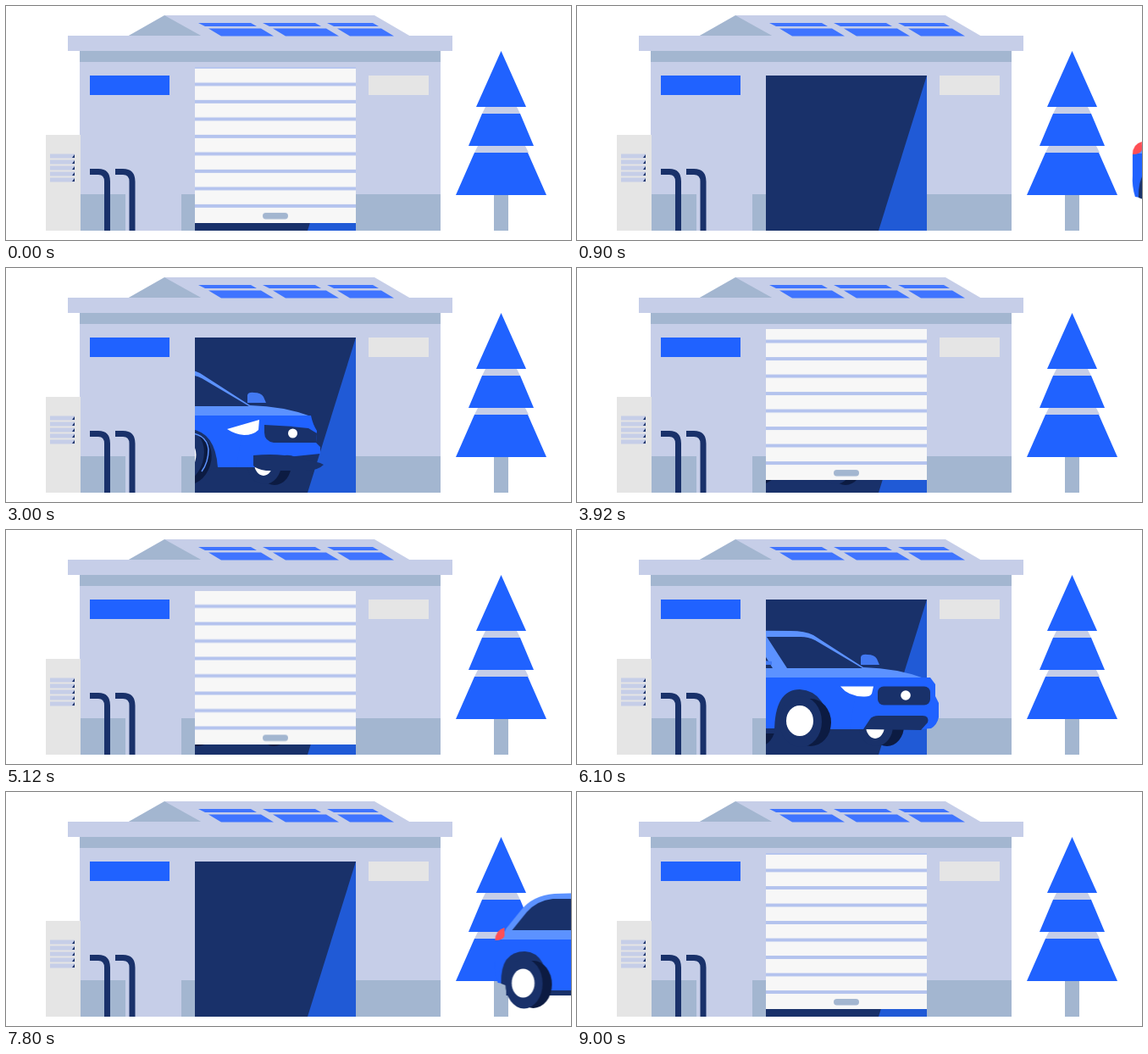
An HTML page that plays this animation: 667x276 px, repeating every 10000 ms.

```html
<!DOCTYPE html>
<html lang="en">
<head>
<meta charset="utf-8">
<title>Garage</title>
<style>
  html, body { margin: 0; width: 100%; height: 100%; overflow: hidden; background: #fff; }
  svg { display: block; width: 100%; height: 100%; }

  .lilac { fill: #c6cee8; }
  .slate { fill: #a3b6d0; }
  .grey { fill: #e5e5e5; }
  .blue { fill: #2062ff; }
  .sky { fill: #5c92ff; }
  .panel { fill: #3f74ff; }
  .navy { fill: #19316a; }
  .night { fill: #0c1b42; }
  .white { fill: #fff; }

  .car, .door, .arriving, .leaving { animation: 10s linear infinite; }
  .car { animation-name: drive; }
  .door { animation-name: roll; }
  .arriving { animation-name: arriving; }
  .leaving { animation-name: leaving; }

  @keyframes drive {
    0% { transform: translateX(420px); }
    8.79% { transform: translateX(420px); animation-timing-function: cubic-bezier(.333, .667, .667, 1); }
    30%, 59.3% { transform: translateX(-218px); }
    59.3% { animation-timing-function: cubic-bezier(.333, 0, .667, .333); }
    82%, 100% { transform: translateX(445px); }
  }
  @keyframes roll {
    0% { transform: translateY(-10px); animation-timing-function: cubic-bezier(.3, .2, .58, 1); }
    10% { transform: translateY(-197px); }
    30% { transform: translateY(-197px); animation-timing-function: ease-in-out; }
    41.5% { transform: none; }
    49.1% { transform: none; animation-timing-function: ease-in-out; }
    61% { transform: translateY(-197px); }
    79.5% { transform: translateY(-197px); animation-timing-function: cubic-bezier(.42, 0, .7, .8); }
    90%, 100% { transform: translateY(-10px); }
  }
  /* The front end straightens while the door hides it. */
  @keyframes arriving {
    0%, 45% { visibility: visible; }
    45.01%, 100% { visibility: hidden; }
  }
  @keyframes leaving {
    0%, 45% { visibility: hidden; }
    45.01%, 100% { visibility: visible; }
  }
</style>
</head>
<body>
<svg viewBox="0 0 667 276" preserveAspectRatio="none">
  <defs>
    <clipPath id="outside"><path d="M223 0H667V276H223z"/></clipPath>
    <clipPath id="doorway"><path d="M223 72H413V266H223z"/></clipPath>
    <pattern id="slats" x="223" y="225.5" width="190" height="20.5" patternUnits="userSpaceOnUse">
      <path fill="#f7f7f7" d="M0 0H190V20.5H0z"/>
      <path fill="#b4c3ee" d="M0 18.5H190V20.5H0zM0 0H190V2H0z"/>
    </pattern>
  </defs>

  <g id="tree">
    <path class="lilac" d="M566 119H603L607 127H562zM557 165H613L617 173H553z"/>
    <path class="slate" d="M576 223H593V265H576z"/>
    <path class="blue" d="M584.5 53L614 119H555zM562 127H607L623 165H546zM553 173H616L638 223H531z"/>
  </g>

  <g id="building">
    <path class="lilac" d="M187 11H435L478 36H187zM87 50H513V265H87z"/>
    <path class="slate" d="M143 36L187 11L232 36z"/>
    <path class="slate" d="M87 53H513V66H87zM87 222H141V265H87zM207 222H223V265H207zM413 222H513V265H413z"/>
    <path class="lilac" d="M73 35H527V53H73z"/>
    <path class="panel" d="M227 20H289L296 24H235zM239 26.5H301L316 35.5H254z
      M303 20H365L372 24H311zM315 26.5H378L393 35.5H330z
      M379 20H433L440 24H387zM391 26.5H443L458 35.5H406z"/>
    <path class="blue" d="M99 82H193V105H99z"/>
    <path class="grey" d="M428 82H499V105H428zM47 152H88V265H47z"/>
    <path stroke="#c6cee8" stroke-width="5" d="M52 177H81M52 184H81M52 191H81M52 198H81M52 205H81"/>
    <path class="navy" d="M81 175V179H78zM81 182V186H78zM81 189V193H78zM81 196V200H78zM81 203V207H78z"/>
    <path fill="none" stroke="#19316a" stroke-width="7" d="M99 195.5H109Q119.5 195.5 119.5 207V265M129 195.5H138Q149 195.5 149 207V265"/>
    <path class="navy" d="M223 82H413V265H223z"/>
    <path fill="#205ad6" d="M413 82V265H356z"/>
  </g>

  <g clip-path="url(#outside)">
    <g class="car">
      <!-- far wheels -->
      <ellipse class="night" cx="383" cy="231" rx="19" ry="24"/>
      <ellipse class="navy" cx="372" cy="231" rx="18" ry="24"/>
      <ellipse class="white" cx="371" cy="232" rx="11" ry="15"/>
      <g class="arriving">
        <ellipse class="night" cx="535" cy="231" rx="20" ry="25"/>
        <ellipse class="navy" cx="523" cy="231" rx="20" ry="24"/>
        <ellipse class="white" cx="522" cy="230" rx="11" ry="15"/>
      </g>
      <g class="leaving">
        <ellipse class="night" cx="534" cy="231" rx="20" ry="24"/>
        <ellipse class="navy" cx="521" cy="231" rx="20" ry="24"/>
        <ellipse class="white" cx="520" cy="231" rx="11" ry="15"/>
      </g>

      <!-- cabin -->
      <path fill="#4279f2" d="M503 159V150Q504 146 511 147Q519 147 522 152L525 159z"/>
      <path class="sky" d="M255 175L262 161L279 140Q293 122 319 120Q370 118 420 119Q437 119 447 124L506 162Q546 163 578 175z"/>
      <path class="navy" d="M269 163L286 142Q298 128 317 126H369Q376 126 380 132L399 163zM392 126H432Q441 126 449 130L505 163H416z"/>
      <path fill="#4279f2" d="M363 158Q363 148 375 147Q385 147 389 154L398 155V159H364z"/>

      <!-- side -->
      <path class="navy" d="M262 226H470V240H262z"/>
      <path class="blue" d="M249 174H530V233Q525 235 500 235H468L464 234H305L252 225Q248 212 249 200z"/>
      <path fill="#ff4f55" d="M260 160V170Q258 175 249 175Q249 163 260 160z"/>
      <rect class="navy" x="351" y="184.500" width="20" height="4.500" rx="2.200"/>

      <!-- rear wheel -->
      <path class="navy" d="M256 226Q255 188 284 188Q311 189 313 239H290z"/>
      <ellipse class="night" cx="294" cy="227" rx="22" ry="28"/>
      <ellipse class="navy" cx="283" cy="226" rx="22" ry="29.500"/>
      <ellipse class="white" cx="282" cy="225.500" rx="13.500" ry="17"/>

      <g class="arriving">
        <path class="blue" d="M500 174H578Q580 184 585 192L584 206L589 211V219L550 223L520 223L505 235H490z"/>
        <path class="navy" d="M523 185Q550 186 575 189L585 195L584 206L534 206Q523 204 523 194z"/>
        <path class="navy" d="M510 221Q530 219 547 221Q553 220 560 223L589 230L593 232Q586 239 572 239H525Q513 237 510 233z"/>
        <path class="white" d="M479 190L517 179L516 191Q510 197 499 197Q488 196 479 190z"/>
        <circle class="white" cx="556.500" cy="195" r="5.500"/>
        <path class="navy" d="M403 239Q403 190 435 190Q465 193 468 235L455 240z"/>
        <ellipse class="night" cx="437" cy="226" rx="23" ry="30" transform="rotate(17 437 226)"/>
        <ellipse class="navy" cx="429" cy="223" rx="22" ry="31" transform="rotate(17 429 223)"/>
        <path fill="none" stroke="#5c92ff" stroke-width="1.500" d="M428 194Q455 194 457 214Q457 229 449 240"/>
        <ellipse class="white" cx="427" cy="223.500" rx="15" ry="20" transform="rotate(17 427 223.500)"/>
      </g>

      <g class="leaving">
        <path class="blue" d="M500 174H585L591 182V196L595 204V221Q593 230 586 234L574 235H490z"/>
        <rect class="navy" x="523" y="184.500" width="62" height="22" rx="7"/>
        <path class="navy" d="M506 235L514 223Q517 219 524 219H576Q584 219 582 227L574 236z"/>
        <path class="white" d="M479 184.500H518L516 193Q514 197 506 196.500Q488 196 479 184.500z"/>
        <circle class="white" cx="556" cy="195" r="5.800"/>
        <path class="navy" d="M401 239Q401 188 431 188Q464 190 466 239z"/>
        <ellipse class="night" cx="444" cy="227" rx="24" ry="28"/>
        <ellipse class="navy" cx="432" cy="226" rx="25" ry="30"/>
        <ellipse class="white" cx="431" cy="225" rx="16" ry="18"/>
      </g>
    </g>
  </g>

  <g clip-path="url(#doorway)">
    <g class="door">
      <path fill="url(#slats)" d="M223 60H413V266H223z"/>
      <rect class="slate" x="303" y="254" width="30" height="7.500" rx="3.700"/>
      <path fill="#f7f7f7" d="M223 262H413V266H223z"/>
    </g>
  </g>
</svg>
</body>
</html>
```
